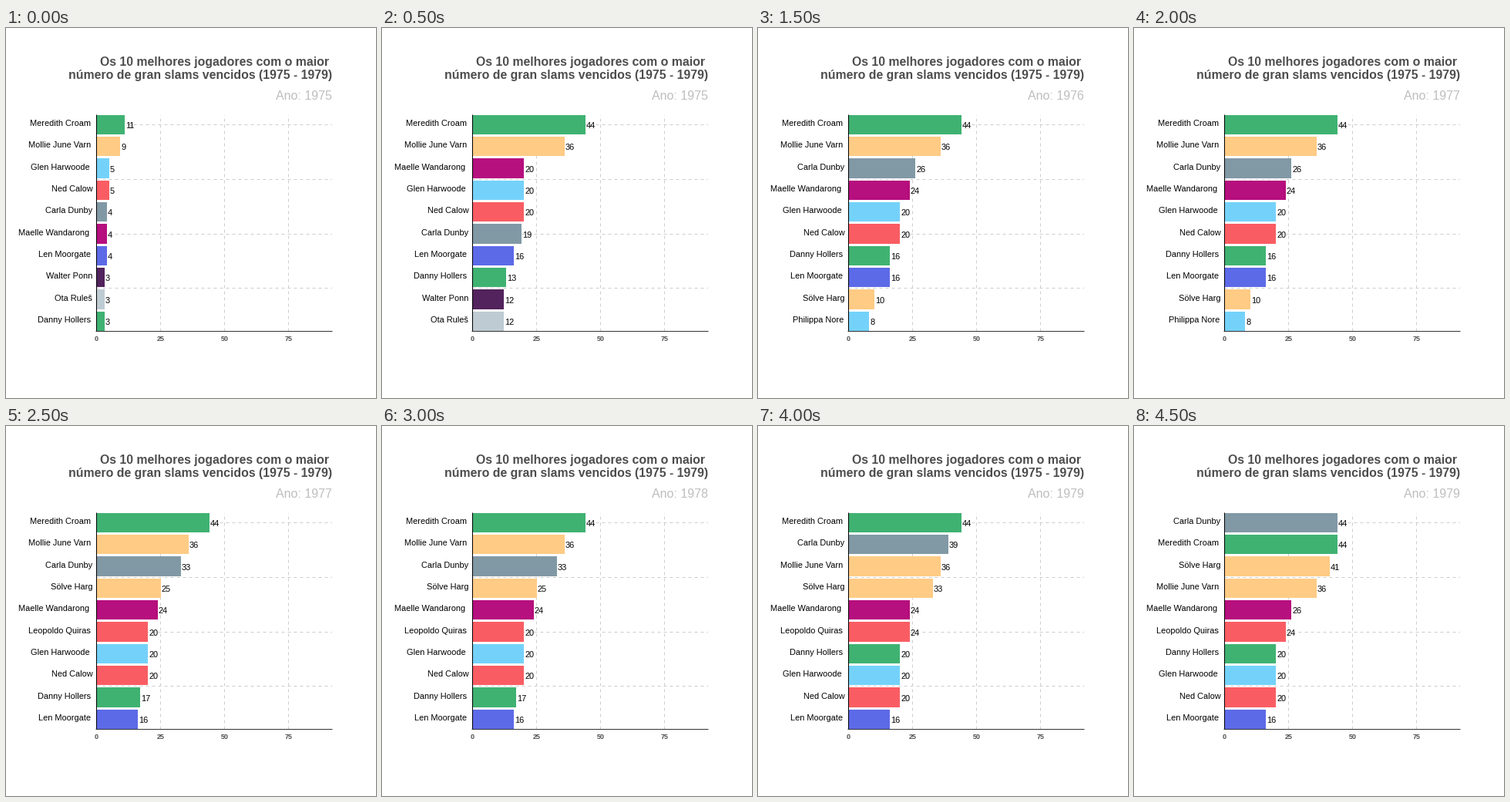
These frames come from a looping animation (480 px wide and 480 px high, 5000 ms). A matplotlib script:

```python
import matplotlib.pyplot as plt
from matplotlib.animation import FuncAnimation
from matplotlib.patches import Rectangle

SIZE, DPI = 480, 100
PX = 72 / DPI
LEFT, RIGHT, BOTTOM = 117.5, 423, 393.5
UNIT, STEP = 3.32, 28.33

GREEN, ORANGE, SKY, RED = "#3fb272", "#ffcb85", "#74d2fa", "#f95d63"
STEEL, PINK, BLUE = "#8199a5", "#b60f7e", "#5c6ae8"
PLUM, SILVER = "#52235c", "#becbd3"

# key: label, right edge of the label, bar colour
PLAYERS = {
    "M": ("Meredith Croam", 110, GREEN),
    "N": ("Mollie June Varn", 110, ORANGE),
    "G": ("Glen Harwoode", 109, SKY),
    "R": ("Ned Calow", 113, RED),
    "C": ("Carla Dunby", 112, STEEL),
    "E": ("Maelle Wandarong", 108, PINK),
    "L": ("Len Moorgate", 110, BLUE),
    "W": ("Walter Ponn", 112, PLUM),
    "O": ("Ota Ruleš", 112, SILVER),
    "D": ("Danny Hollers", 110, GREEN),
    "S": ("Sölve Harg", 112, ORANGE),
    "P": ("Philippa Nore", 111, SKY),
    "Q": ("Leopoldo Quiras", 110, RED),
}

RANKINGS = [
    "M11 N9 G5 R5 C4 E4 L4 W3 O3 D3",
    "M44 N36 E20 G20 R20 C19 L16 D13 W12 O12",
    "M44 N36 C26 E24 G20 R20 D16 L16 S10 P8",
    "M44 N36 C33 S25 E24 Q20 G20 R20 D17 L16",
    "M44 C39 N36 S33 E24 Q24 D20 G20 R20 L16",
    "C44 M44 S41 N36 E26 Q24 D20 G20 R20 L16",
]

plt.rcParams["font.family"] = "Liberation Sans"
fig = plt.figure(figsize=(SIZE / DPI, SIZE / DPI), dpi=DPI, facecolor="white")
ax = fig.add_axes([0, 0, 1, 1])
ax.set_xlim(0, SIZE)
ax.set_ylim(SIZE, 0)
ax.axis("off")


def line(xs, ys, color, z, **style):
    ax.plot(xs, ys, color=color, lw=PX, zorder=z, snap=False, **style)


def label(x, y, text, size, color="black", ha="right", **style):
    return ax.text(x, y, text, fontsize=size * PX, color=color, ha=ha,
                   va="baseline", zorder=5, **style)


GRID = dict(color="#cccdd0", z=1, linestyle=(0, (4, 4)))
for y in (125.5, 196.5, 267.5, 337.5):
    line([LEFT, RIGHT], [y, y], **GRID)
for i in range(4):
    x = LEFT + 83 * i
    if i:
        line([x, x], [BOTTOM, 113], **GRID)
    label(x, 406, str(25 * i), 9, "#4d4d4d", "center", weight="bold")

line([LEFT, LEFT], [113, BOTTOM], "black", 4)
line([LEFT - 0.5, RIGHT], [BOTTOM, BOTTOM], "#333333", 4)

label(419, 49, "Os 10 melhores jogadores com o maior", 15.9, "#4d4d4d", weight="bold")
label(RIGHT, 66, "número de gran slams vencidos (1975 - 1979)", 15.9, "#4d4d4d",
      weight="bold")
year = label(RIGHT, 93, "", 16, "#bebebe")

rows = []
for k in range(10):
    top, end = round(112.7 + STEP * k), round(138 + STEP * k)
    bar = Rectangle((118, top), 0, end - top, lw=0, antialiased=False, zorder=3)
    ax.add_patch(bar)
    name = label(0, round(127 + STEP * k), "", 11)
    value = label(0, round(130 + STEP * k), "", 11, ha="left")
    rows.append((bar, name, value))


def draw(frame):
    # bars and year advance in alternating half seconds
    year.set_text(f"Ano: {1975 + frame // 2}")
    ranking = RANKINGS[(frame + 1) // 2].split()
    for (bar, name, value), entry in zip(rows, ranking):
        text, edge, color = PLAYERS[entry[0]]
        end = round(LEFT + 0.2 + UNIT * int(entry[1:]))
        bar.set_width(end - 118)
        bar.set_facecolor(color)
        name.set_text(text)
        name.set_x(edge)
        value.set_text(entry[1:])
        value.set_x(end + 1)
    return []


anim = FuncAnimation(fig, draw, frames=10, interval=500, repeat=True,
                     init_func=lambda: draw(0))
plt.show()
```
